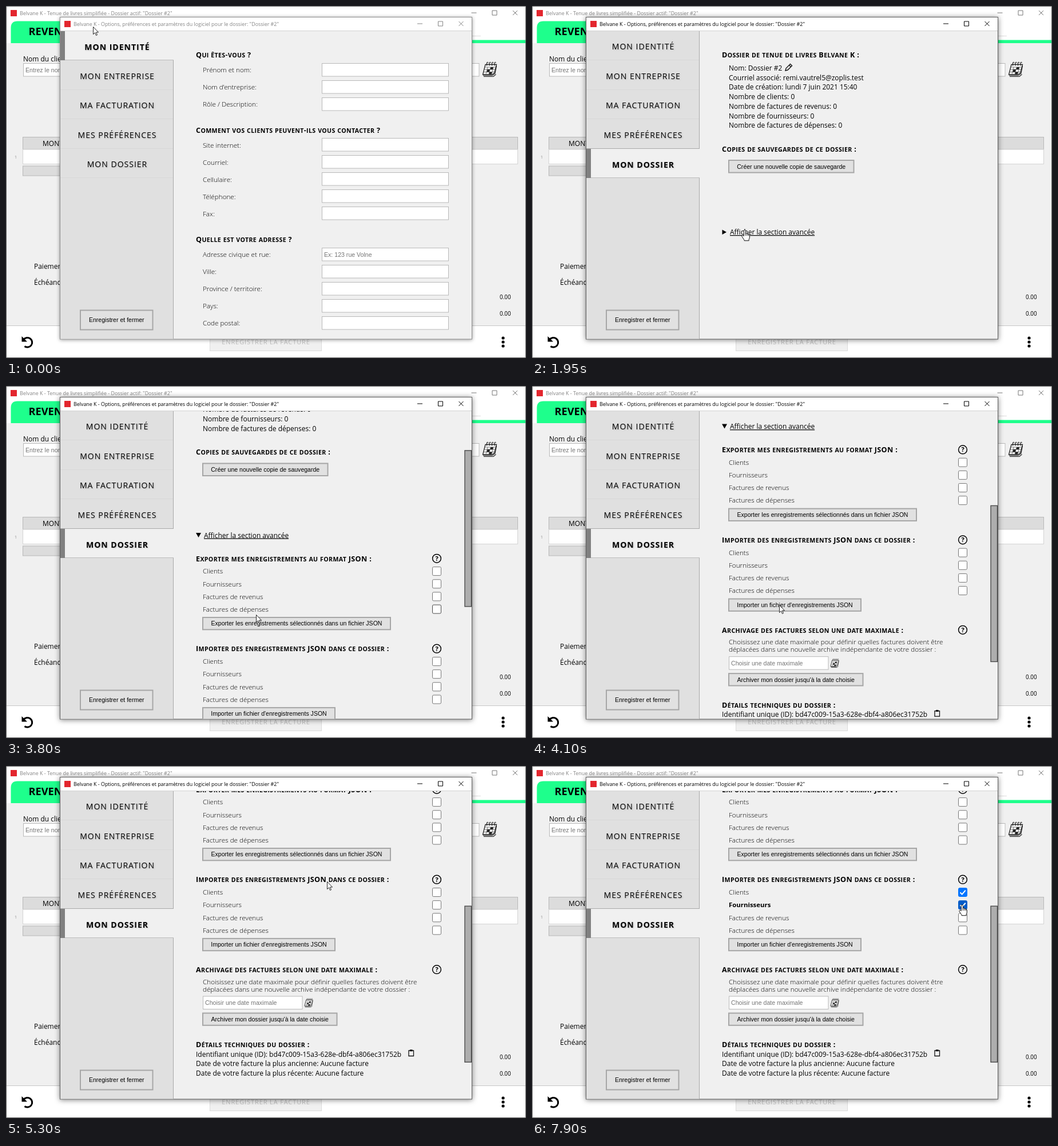
Write an HTML page that moves like this. It is 909 px wide and 616 px high and loops after 8 s.

```html
<!DOCTYPE html>
<html lang="fr">
<head>
<meta charset="utf-8">
<title>Options du dossier</title>
<style>
html, body { margin: 0; width: 100%; height: 100%; overflow: hidden; background: #fff; }
svg { display: block; }
text { font: 11.98px "Open Sans", "Noto Sans", sans-serif; fill: #000; white-space: pre; }
text.light { font-size: 11.7px; font-weight: 300; }
text.light.focus { font-size: 11.4px; font-weight: 700; }
text.head { font-size: 12.6px; font-weight: 700; letter-spacing: .36px; }
text.head .small { font-size: 10.6px; }
text.arial { font: 10.55px "Liberation Sans", Arial, sans-serif; }
text.hint { font: 10.6px "Liberation Sans", Arial, sans-serif; fill: #757575; }
text.title { font-size: 8.9px; }
text.tab { font-size: 14px; letter-spacing: 1px; text-anchor: middle; }
text.sel { font-weight: 700; }
.mid { text-anchor: middle; }
.tabs { filter: drop-shadow(1px 1px 1px rgba(0,0,0,.2)); }
</style>
</head>
<body>
<svg id="stage" width="909" height="616" viewBox="0 0 909 616">
  <defs>
    <clipPath id="pane"><rect x="293" y="44" width="521" height="538.5"/></clipPath>
    <g id="cal" fill="none" stroke="#222">
      <path d="M6 5.500H25.500L21.500 20.500 17 23H1.500z" fill="#fff" stroke-width="1.3"/>
      <path d="M2 24.800H18L23 21 25.500 8M3 26.500H20L24.500 22.500" stroke-width="1.100"/>
      <path d="M5 10H24M4 14H23M3 18.500H22M10 10L7 22M15 10L12 22M20 10L17 22" stroke="#555" stroke-width=".8"/>
      <path d="M15.500 10h4.300l-1 4h-4.300zM9.500 14h4.300l-1 4.500H8.300zM13.300 18.500h4.300L16.500 22.500h-4.300z" fill="#222" stroke="none"/>
      <path d="M8.500 7.500V2.500q1.300-2.500 2.400 0M13 7.500V2.500q1.300-2.500 2.400 0M17.500 7.500V2.500q1.300-2.500 2.400 0M22 7.500V2.500q1.300-2.500 2.400 0" stroke-width="1.200"/>
    </g>
    <g id="buttons" fill="none" stroke-width="1">
      <path d="M0 4.500H9M36.500 .5h8v8h-8zM72.500 .5l8 8M80.500 .5l-8 8"/>
    </g>
  </defs>
</svg>
<script>
const LOOP = 8000, TICK = 50;
const svg = document.getElementById('stage');

function el(parent, tag, attrs) {
  const n = document.createElementNS('http://www.w3.org/2000/svg', tag);
  for (const k in attrs) n.setAttribute(k, attrs[k]);
  return parent.appendChild(n);
}
const group = (p, attrs) => el(p, 'g', attrs);
const path = (p, d, attrs) => el(p, 'path', { d, fill: 'none', stroke: '#111', ...attrs });
const box = (p, x, y, width, height, fill, stroke, more) =>
  el(p, 'rect', { x, y, width, height, fill, stroke: stroke || 'none', ...more });
function text(p, x, y, str, cls = '', more) {
  const n = el(p, 'text', { x, y, class: cls, ...more });
  n.textContent = str;
  return n;
}
function heading(p, y, str) {
  const n = text(p, 332, y, '', 'head');
  for (const run of str.match(/[a-zà-ÿ]+|[^a-zà-ÿ]+/g)) {
    const small = /[a-zà-ÿ]/.test(run);
    el(n, 'tspan', small ? { class: 'small' } : {}).textContent = run.toUpperCase();
  }
}
function button(p, x, y, w, h, label) {
  box(p, x + 1, y + 1, w - 2, h - 2, '#e1e1e1', '#a6a6a6', { 'stroke-width': 2 });
  text(p, x + w / 2, y + h / 2 + 3.8, label, 'arial mid');
}
const field = (p, x, y, w) => box(p, x + .5, y + .5, w - 1, 22.5, '#fff', '#b9b9b9');
const show = (n, on) => n.setAttribute('visibility', on ? 'visible' : 'hidden');

// Main window behind the dialog
const back = group(svg);
box(back, 0, 0, 909, 616, '#fff');
box(back, 8, 7, 11, 11, '#e3262e');
text(back, 24, 16, 'Belvane K - Tenue de livres simplifiée - Dossier actif: "Dossier #2"', 'title', { style: 'fill:#858585' });
el(back, 'use', { href: '#buttons', x: 813.5, y: 7.5, stroke: '#777' });
path(back, 'M8.500 65V38Q8.500 26.500 20 26.500H300V59.500H909V65z', { fill: '#1eff8c', stroke: 'none' });
path(back, 'M810 52.500H830', { stroke: '#ddd' });
text(back, 39.5, 51, 'REVENUS', '', { style: 'font-size:18.2px;font-weight:700' });
box(back, 0, 65, 909, 495, '#f0f0f0');
text(back, 30, 97, 'Nom du client:');
field(back, 30, 100, 797.5);
text(back, 34, 115.5, 'Entrez le nom du client', 'hint');
el(back, 'use', { href: '#cal', x: 832, y: 97 });
box(back, 29.5, 229.5, 865, 21.5, '#dcdcdc', '#b8b8b8');
text(back, 64, 245, 'MONTANT');
text(back, 812.5, 245, 'l', '', { style: 'fill:#2424b0' });
box(back, 29.5, 251, 865, 25.5, '#fff', '#d4d4d4');
text(back, 15, 267, '1', '', { style: 'font-size:7px;fill:#888' });
box(back, 29.5, 280, 300, 17, '#dcdcdc', '#b8b8b8');
text(back, 49, 460, 'Paiement:');
text(back, 49, 488, 'Échéance:');
for (const y of [513, 541.5]) text(back, 863, y, '0.00', '', { style: 'font-size:9.9px' });
path(back, 'M0 559.500H909', { stroke: '#c6c6c6' });
box(back, 356.5, 570.5, 195, 33, '#f0f0f0', '#dcdcdc');
text(back, 454.5, 592, 'ENREGISTRER LA FACTURE', 'mid', { style: 'font-size:11px;letter-spacing:.9px;fill:#bdbdbd' });
path(back, 'M31 583.500A8.300 8.300 0 1 1 32.500 595.500', { stroke: '#000', 'stroke-width': 3 });
path(back, 'M27.500 578V587.500H37z', { fill: '#000', stroke: 'none' });
for (const cy of [581, 588, 595]) el(back, 'circle', { cx: 869, cy, r: 2.6 });
box(back, .5, .5, 908, 615, 'none', '#5a5a5a');

// Dialog frame
const frame = box(svg, 94.5, 19.5, 720, 563.5, '#f0f0f0', '#777');
box(svg, 95, 20, 719, 23.5, '#fff');
path(svg, 'M95 43.500H814', { stroke: '#d2d2d2' });
box(svg, 102, 26, 11, 11, '#e3262e');
const title = text(svg, 118, 34.5, 'Belvane K - Options, préférences et paramètres du logiciel pour le dossier: "Dossier #2"', 'title');
const controls = el(svg, 'use', { href: '#buttons', x: 719, y: 26.5 });

// Sidebar with one selected tab
const TABS = ['MON IDENTITÉ', 'MON ENTREPRISE', 'MA FACTURATION', 'MES PRÉFÉRENCES', 'MON DOSSIER'];
function sidebar(sel) {
  const g = group(svg), pitch = 51.5, top = 44, edge = '#a9a9a9';
  box(g, 95, top, 197.5, 538.5, '#e0e0e0');
  path(g, 'M292.500 44V582.500', { stroke: edge });
  for (let i = 1; i <= 5; i++) path(g, `M95 ${Math.floor(top + i * pitch) - .5}H292`, { stroke: '#d8d8d8' });
  const y = Math.floor(top + sel * pitch);
  box(g, 95, y, 198, 51, '#f0f0f0');
  box(g, 95, y, 8, 51, '#808080');
  if (sel) path(g, `M95 ${y - .5}H293`, { stroke: edge });
  path(g, `M103 ${y + 50.5}H293`, { stroke: '#bcbcbc' });
  const labels = group(g, { class: 'tabs' });
  TABS.forEach((s, i) => text(labels, 194.5, 76 + i * pitch + (i === sel ? .5 : 0), s, i === sel ? 'tab sel' : 'tab'));
  button(g, 129, 531.5, 128.5, 36, 'Enregistrer et fermer');
  return g;
}
const sides = [sidebar(0), sidebar(4)];
const pane = group(svg, { 'clip-path': 'url(#pane)' });

// Identity page
const identity = group(pane);
function form(y, name, labels) {
  heading(identity, y, name);
  labels.forEach((s, i) => {
    const top = y + 9.7 + i * 30.05;
    text(identity, 344, top + 16.3, s, 'light');
    field(identity, 552, Math.round(top), 222);
  });
}
form(90, 'Qui êtes-vous ?', ['Prénom et nom:', "Nom d'entreprise:", 'Rôle / Description:']);
form(221.5, 'Comment vos clients peuvent-ils vous contacter ?',
  ['Site internet:', 'Courriel:', 'Cellulaire:', 'Téléphone:', 'Fax:']);
form(413, 'Quelle est votre adresse ?',
  ['Adresse civique et rue:', 'Ville:', 'Province / territoire:', 'Pays:', 'Code postal:']);
text(identity, 556, 438.5, 'Ex: 123 rue Volne', 'hint');

// Folder page
const folder = group(pane);
heading(folder, 90, 'Dossier de tenue de livres Belvane K :');
['Nom: Dossier #2', 'Courriel associé: remi.vautrel5@zoplis.test', 'Date de création: lundi 7 juin 2021 15:40',
  'Nombre de clients: 0', 'Nombre de factures de revenus: 0', 'Nombre de fournisseurs: 0',
  'Nombre de factures de dépenses: 0'].forEach((s, i) => text(folder, 344, 113 + i * 16.7, s));
path(folder, 'M443 113l1-4 7.500-7.500 3 3-7.500 7.500zM449.500 103.500l3 3', { 'stroke-width': 1.4 });
heading(folder, 254.5, 'Copies de sauvegardes de ce dossier :');
button(folder, 343, 269, 220.5, 23.5, 'Créer une nouvelle copie de sauvegarde');
const shut = path(folder, 'M332.500 391.500V400l7.500-4.250z', { fill: '#000', stroke: 'none' });
const open = path(folder, 'M332 391.500H341l-4.500 8z', { fill: '#000', stroke: 'none' });
text(folder, 346, 400, 'Afficher la section avancée', '', { 'text-decoration': 'underline' });

// Advanced section
const adv = group(folder), ROW = 22.15, checks = [];
function help(y) {
  el(adv, 'circle', { cx: 753, cy: y, r: 7.4, fill: 'none', stroke: '#000', 'stroke-width': 1.5 });
  text(adv, 753, y + 4, '?', 'mid', { style: 'font-size:11px;font-weight:700' });
}
function choices(y, name, label, w) {
  heading(adv, y + 4.7, name);
  help(y);
  ['Clients', 'Fournisseurs', 'Factures de revenus', 'Factures de dépenses'].forEach((s, i) => {
    const mid = y + 22.3 + i * ROW;
    const row = { mid, label: text(adv, 344, mid + 4.3, s, 'light') };
    row.square = box(adv, 745.5, mid - 7.5, 15, 15, '#fff', '#767676', { rx: 2 });
    row.tick = path(adv, `M748.500 ${mid + .3}l3.200 3.300 6-7`, { stroke: '#fff', 'stroke-width': 2 });
    checks.push(row);
  });
  button(adv, 343, y + 102.2, w, 23.3, label);
}
choices(436.3, 'Exporter mes enregistrements au format JSON :',
  'Exporter les enregistrements sélectionnés dans un fichier JSON', 330);
choices(594.2, 'Importer des enregistrements JSON dans ce dossier :',
  "Importer un fichier d'enregistrements JSON", 233);
heading(adv, 756.5, 'Archivage des factures selon une date maximale :');
help(751.7);
text(adv, 344, 777, 'Choisissez une date maximale pour définir quelles factures doivent être', 'light');
text(adv, 344, 790, 'déplacées dans une nouvelle archive indépendante de votre dossier :', 'light');
field(adv, 344, 798, 174.5);
text(adv, 348, 813.5, 'Choisir une date maximale', 'hint');
el(adv, 'use', { href: '#cal', transform: 'translate(521 801.500) scale(.6)' });
button(adv, 343, 827, 236.5, 23.3, "Archiver mon dossier jusqu'à la date choisie");
heading(adv, 887.5, 'Détails techniques du dossier :');
['Identifiant unique (ID): bd47c009-15a3-628e-dbf4-a806ec31752b', 'Date de votre facture la plus ancienne: Aucune facture',
  'Date de votre facture la plus récente: Aucune facture'].forEach((s, i) => text(adv, 332, 904 + i * 16.7, s));
path(adv, 'M704 893.500h8.500v9.500H704z', { 'stroke-width': 1.3 });
box(adv, 706, 891.8, 4.5, 3, '#111');
const thumb = box(pane, 802, 44.7, 11.5, 273, '#adadad', '#4a4a4a', { 'stroke-width': 1.4 });

// Mouse pointer, hot spot at 0,0
const pointer = group(svg, { 'stroke-linejoin': 'round' });
const arrow = path(pointer, 'M.5 .5V13.500l3-2.800 2 4.800 2-.9-2-4.600H9.500z', { fill: '#fff', 'stroke-width': .9 });
const hand = group(pointer);
path(hand, 'M-1.700 10.500V1.300a1.500 1.500 0 0 1 3 0V6.300l.2-.6q1.300-.6 2.300 .3l.2 .8q1.400-.6 2.200 .4l.2 .8q1.600-.3 1.900 1V13q0 2-1.200 3.500V18.700H-1V17.500L-4.800 11.800q-.6-1.600 .4-2.300 1.200-.6 2.700 1z',
  { fill: '#fff' });
path(hand, 'M1.300 6v4M3.900 6.800v3.200M6.300 7.600v2.600', { 'stroke-width': .9 });

// Keys: time, x, y
const MOVES = [
  [0, 152, 36], [250, 92, 130], [480, 183, 262], [600, 152, 280], [700, 152, 280], [900, 226, 280],
  [1650, 226, 280], [1950, 372, 392], [2250, 484, 399], [2500, 465, 401], [2650, 466, 401],
  [3200, 466, 401], [3350, 465, 400], [3450, 465, 400], [3800, 437, 400], [4300, 427, 358],
  [4600, 359, 202], [4750, 359, 202], [5600, 675, 202], [6200, 751, 225], [6300, 751, 225],
  [6350, 752, 225], [6900, 752, 225], [7250, 742, 236], [7650, 752, 243]
];
const SCROLL = [[3450, 0], [3800, 134.5], [4300, 395.5]];

// Smooth monotone curve through the keys
function curve(keys, t, c) {
  const n = keys.length - 1;
  if (t <= keys[0][0]) return keys[0][c];
  if (t >= keys[n][0]) return keys[n][c];
  const i = keys.findIndex(k => k[0] > t) - 1;
  const slope = j => (keys[j + 1][c] - keys[j][c]) / (keys[j + 1][0] - keys[j][0]);
  const tangent = j => {
    if (j === 0 || j === n) return 0;
    const a = slope(j - 1), b = slope(j);
    return a * b > 0 ? 2 * a * b / (a + b) : 0;
  };
  const h = keys[i + 1][0] - keys[i][0], u = (t - keys[i][0]) / h, v = 1 - u;
  return keys[i][c] * v * v * (1 + 2 * u) + keys[i + 1][c] * u * u * (3 - 2 * u)
    + h * u * v * (tangent(i) * v - tangent(i + 1) * u);
}

function render(t) {
  const active = t >= 1150, onFolder = t >= 1200, opened = t >= 2950;
  const x = curve(MOVES, t, 1), y = curve(MOVES, t, 2), scroll = curve(SCROLL, t, 1);

  frame.setAttribute('stroke', active ? '#5c5c5c' : '#8c8c8c');
  frame.style.filter = active ? 'drop-shadow(0 1px 5px rgba(0,0,0,.5))' : 'drop-shadow(0 1px 3px rgba(0,0,0,.4))';
  title.style.fill = active ? '#000' : '#858585';
  controls.setAttribute('stroke', active ? '#000' : '#858585');

  sides.forEach((s, i) => s.style.display = onFolder === !!i ? '' : 'none');
  identity.style.display = onFolder ? 'none' : '';
  folder.style.display = onFolder ? '' : 'none';
  adv.style.display = thumb.style.display = opened ? '' : 'none';
  show(shut, !opened);
  show(open, opened);
  folder.setAttribute('transform', `translate(0 ${-scroll})`);
  thumb.setAttribute('transform', `translate(0 ${scroll * .507})`);

  const focus = t >= 7800 ? 5 : t >= 6700 ? 4 : -1;
  checks.forEach((row, i) => {
    const hover = x > 344 && x < 761 && Math.abs(y + scroll - row.mid) < ROW / 2;
    const on = i === 4 && t >= 6750 || i === 5 && t >= 7900;
    const blue = hover ? '#005cc8' : '#0075ff';
    row.square.setAttribute('fill', on ? blue : '#fff');
    row.square.setAttribute('stroke', on ? blue : hover ? '#4a4a4a' : '#767676');
    row.label.setAttribute('class', i === focus ? 'light focus' : 'light');
    show(row.tick, on);
  });

  const overTab = x < 292 && y > 44 && y < 301;
  const overLink = onFolder && x > 346 && x < 494 && y + scroll > 388 && y + scroll < 404;
  const overCheck = opened && x > 740 && x < 761 && y > 213 && y < 295;
  const link = overTab || overLink || overCheck;
  show(hand, link);
  show(arrow, !link);
  pointer.setAttribute('transform', `translate(${Math.round(x)} ${Math.round(y)})`);
}

const start = performance.now();
function loop() {
  const t = (performance.now() - start) % LOOP;
  render(Math.floor(t / TICK) * TICK);
  requestAnimationFrame(loop);
}
loop();
</script>
</body>
</html>
```
